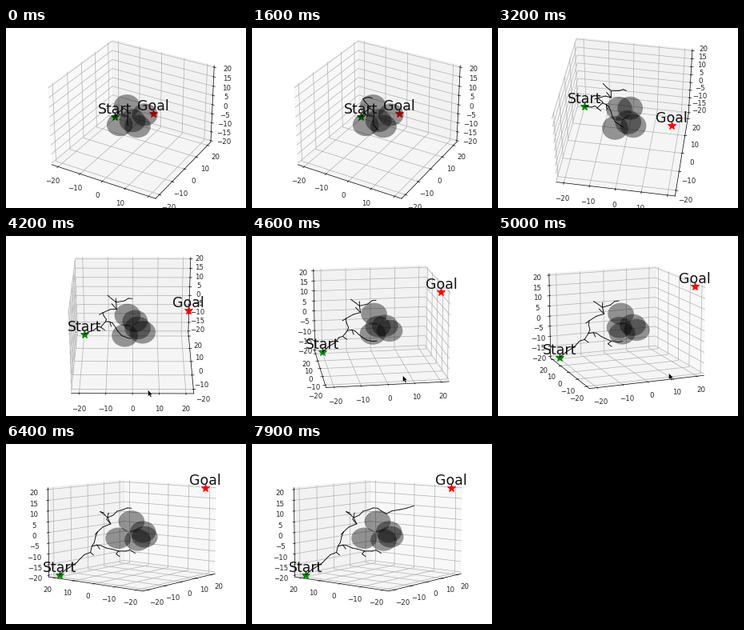
A matplotlib script for the animation above (8000 ms loop, 300 px wide and 225 px high).

```python
import numpy as np
import matplotlib.pyplot as plt
from matplotlib.animation import FuncAnimation
from matplotlib.collections import LineCollection
from matplotlib.patches import Ellipse

W, H, DPI = 300, 225, 62.5
FRAMES, STEP = 80, 100
LIMITS = np.array([22.92, 22.92, 20.83])
BOX = np.array([4, 4, 3]) * 1.8294640721620434 * 25 / 24 / np.sqrt(41) / 2
SCALE = BOX / LIMITS
CAMERA = 10
RADIUS = 5

START = (-20, 20, -20)
GOAL = (20, -20, 20)
SPHERES = np.array([
    (-2, -1, 5), (-3, -4.8, -3.2), (3.8, -2.9, -2.8),
    (0.9, 8, -4.2), (1.9, -3.5, -0.1),
])

# Tree nodes in space
NODES = {
    "root": START,
    "trunk": (-12.8, 10.5, -9.3),
    "twig": (-11.2, 10.3, -10.8),
    "fork": (-10.8, 11.5, -6.8),
    "low1": (-9.1, 10.4, -6.3),
    "drop": (-8.6, 9.4, -8.2),
    "low2": (-6.7, 7.8, -7.8),
    "low3": (-4.3, 3.5, -9.1),
    "low4": (-0.6, 0.8, -8.8),
    "low5": (1.2, -0.3, -10.5),
    "hook1": (-5.5, 3.8, -10.3),
    "hook2": (-4.2, 3.2, -11.6),
    "up1": (-11.8, 7.8, 0.4),
    "spur": (-13.2, 7.8, -0.6),
    "mid": (-8.8, 7.6, 2.4),
    "up2": (-6.3, 5.8, 3.7),
    "up3": (-6.5, 7.2, 6.5),
    "knot": (-8.2, 6.4, 6.2),
    "left1": (-8.2, 7.4, 8.2),
    "left2": (-9.8, 8.1, 9.6),
    "left3": (-8.0, 7.8, 8.9),
    "peak": (-6.6, 6.6, 8.9),
    "right1": (-3.2, 7, 7.4),
    "right2": (-0.2, 5.5, 9.5),
    "far1": (2, 2.2, 10.5),
    "far2": (4, -0.6, 7.9),
    "far3": (7.5, -4.5, 9.8),
    "far4": (11.5, -8.3, 11.5),
}

# Parent, child and the time at which the edge starts to grow
EDGES = [
    ("root", "trunk", -2000), ("trunk", "fork", -2000),
    ("fork", "low1", -2000), ("low1", "low2", -2000),
    ("low2", "low3", -2000), ("trunk", "twig", 400),
    ("fork", "up1", 600), ("up1", "mid", 1000), ("mid", "up2", 1200),
    ("low3", "low4", 1500), ("up2", "up3", 1900),
    ("up3", "right1", 1900), ("right1", "right2", 2000),
    ("up1", "spur", 2300), ("low1", "drop", 2400),
    ("up3", "left1", 2500), ("left1", "left2", 2700),
    ("up2", "knot", 2900), ("up3", "peak", 3900),
    ("low3", "hook1", 4900), ("hook1", "hook2", 5000),
    ("left2", "left3", 5100), ("low4", "low5", 5900),
    ("right2", "far1", 6300), ("far1", "far2", 6800),
    ("far2", "far3", 7400), ("far3", "far4", 7700),
]

# Camera and pointer keys
VIEW_T = [2100, 3000, 3900, 4500, 4800, 5000, 5400, 5700, 5800]
AZIM = [-60, -81, -81, -98.6, -98.6, -111.9, -139.7, -139.7, -141.4]
ELEV = [30, 43.5, 43.5, 15.2, 15.2, 13.1, 8.5, 8.5, 7.5]
POINTER_T = [3900, 4500, 4800, 5000, 5400]
POINTER_X = [165, 188, 188, 213, 239]
POINTER_Y = [210, 174, 174, 171, 167]


def grow_tree():
    """Split every edge into short crooked pieces with a time of birth."""
    rng = np.random.default_rng(4)
    pieces, born = [], []
    for a, b, t0 in EDGES:
        p, q = np.array(NODES[a], float), np.array(NODES[b], float)
        n = max(1, round(np.linalg.norm(q - p) / 2.5))
        pts = np.linspace(p, q, n + 1)
        pts[1:-1] += rng.uniform(-0.7, 0.7, (n - 1, 3))
        for k in range(n):
            pieces.append(pts[k:k + 2])
            born.append(t0 + STEP * k)
    return np.array(pieces), np.array(born)


def project(points, azim, elev):
    """Perspective view: plane position and distance from the camera."""
    x, y, z = np.moveaxis(np.asarray(points, float) * SCALE, -1, 0)
    a, e = np.radians(azim), np.radians(elev)
    near = np.cos(a) * x + np.sin(a) * y
    dist = CAMERA - np.cos(e) * near - np.sin(e) * z
    right = -np.sin(a) * x + np.cos(a) * y
    up = -np.sin(e) * near + np.cos(e) * z
    return np.stack([right / dist, up / dist], axis=-1), dist


fig = plt.figure(figsize=(W / DPI, H / DPI), dpi=DPI, facecolor="white")
SIDE = 231
rect = [39.8 / W, -2.8 / H, SIDE / W, SIDE / H]

ax = fig.add_axes(rect, projection="3d")
ax.set_xlim(-LIMITS[0], LIMITS[0])
ax.set_ylim(-LIMITS[1], LIMITS[1])
ax.set_zlim(-LIMITS[2], LIMITS[2])
ax.set_xticks(range(-20, 21, 10))
ax.set_yticks(range(-20, 21, 10))
ax.set_zticks(range(-20, 21, 5))
ax.tick_params(labelcolor="#222222")

# Flat layer over the box, in the box's own plane units
top = fig.add_axes(rect, zorder=5)
top.set_axis_off()
top.set_xlim(-0.095, 0.09)
top.set_ylim(-0.095, 0.09)

ends = [START, GOAL]
stars = [top.plot([0], [0], "*", ms=12, color=c, zorder=2, clip_on=False)[0]
         for c in ("green", "red")]
names = [top.text(0, 0, s, fontsize=20, color="#111111", ha="center",
                  va="bottom", zorder=6)
         for s in ("Start", "Goal")]
balls = [Ellipse((0, 0), 1, 1, fc="black", ec="none", alpha=0.4, zorder=3)
         for _ in SPHERES]
for ball in balls:
    top.add_patch(ball)
tree = LineCollection([], colors="black", linewidths=1, zorder=4,
                      capstyle="round")
top.add_collection(tree, autolim=False)

ARROW = [(0, 0), (0, -14), (3.2, -11), (5.5, -16), (8, -15),
         (5.7, -10), (10, -10), (0, 0)]
pointer = plt.Line2D([0], [0], marker=ARROW, ms=21, mfc="black", mec="white",
                     mew=0.4, ls="none", transform=fig.transFigure, zorder=10)
fig.add_artist(pointer)

pieces, born = grow_tree()


def update(i):
    t = i * STEP
    azim = np.interp(t, VIEW_T, AZIM)
    elev = np.interp(t, VIEW_T, ELEV)
    ax.view_init(elev=elev, azim=azim)

    spots, _ = project(ends, azim, elev)
    for (x, y), star, name in zip(spots, stars, names):
        star.set_data([x], [y])
        name.set_position((x, y))

    e = np.radians(elev)
    wide = 2 * RADIUS * SCALE[0]
    tall = 2 * RADIUS * np.hypot(SCALE[0] * np.sin(e), SCALE[2] * np.cos(e))
    centers, dist = project(SPHERES, azim, elev)
    for ball, center, d in zip(balls, centers, dist):
        ball.set_center(center)
        ball.set_width(wide / d)
        ball.set_height(tall / d)

    tree.set_segments(list(project(pieces[born <= t], azim, elev)[0]))

    pointer.set_visible(4100 <= t <= 5700)
    pointer.set_data([np.interp(t, POINTER_T, POINTER_X) / W],
                     [1 - np.interp(t, POINTER_T, POINTER_Y) / H])
    return []


anim = FuncAnimation(fig, update, frames=FRAMES, interval=STEP,
                     repeat=True, repeat_delay=0, blit=False)
plt.show()
```
